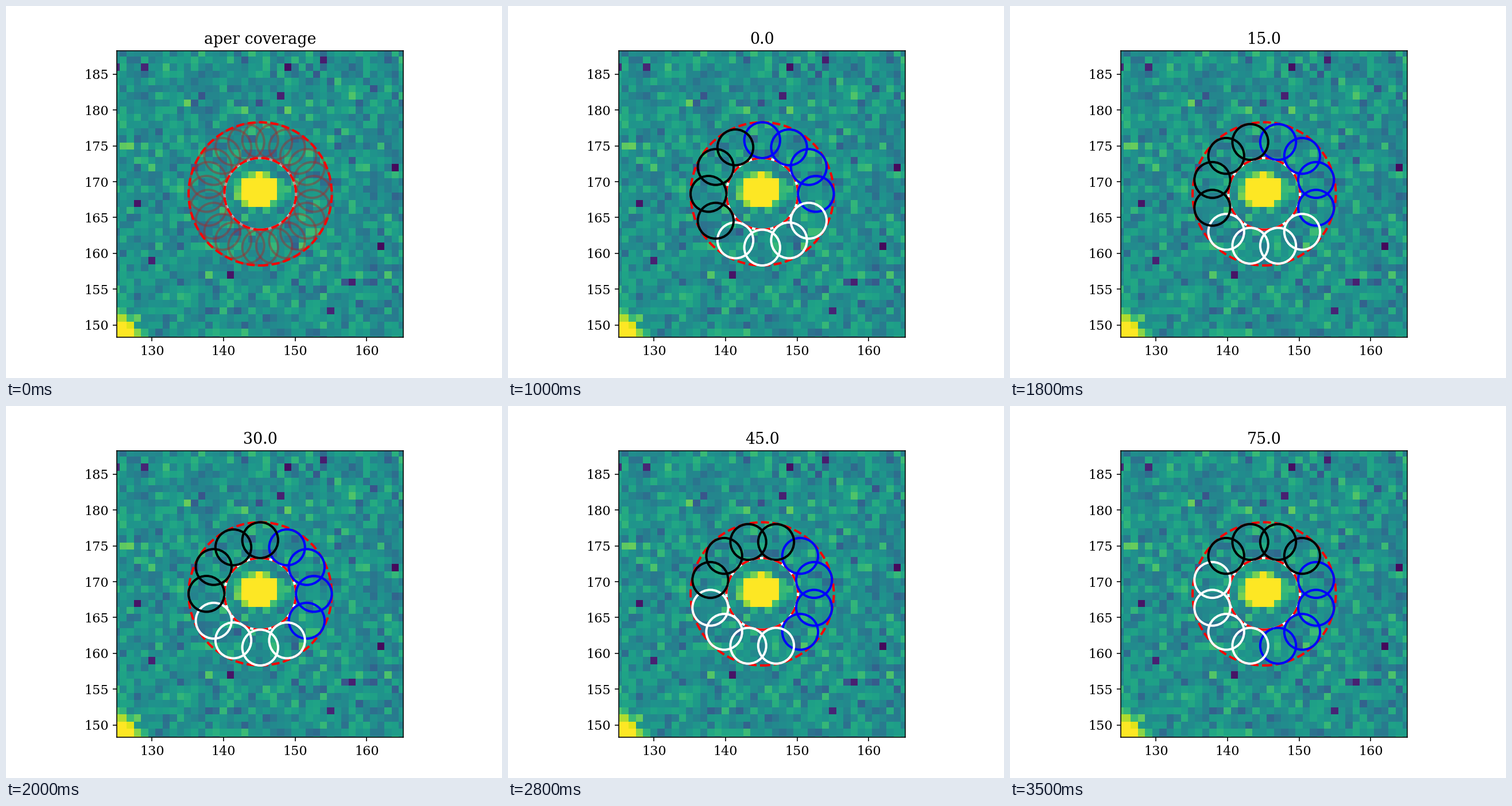
Animation, 864 px wide and 648 px high, one loop 4 s. Source, as a matplotlib script:

```python
import matplotlib.pyplot as plt
import numpy as np
from matplotlib.animation import FuncAnimation
from matplotlib.patches import Circle

plt.rcParams.update({"font.family": "DejaVu Serif", "font.size": 11.2})

CX, CY = 145.12, 168.3          # target position in detector pixels
HALF = 20                       # half width of the cutout
R_IN, R_OUT = 5, 10
R_MID, R_APER = (R_IN + R_OUT) / 2, (R_OUT - R_IN) / 2
X0, Y0, SIZE = 125, 148, 41
DASHES = (0, (3.5, 1.5))
COLORS = ("blue", "white", "black")

DEAD = [(129, 186), (149, 186), (125, 186), (128, 167), (162, 161), (158, 156),
        (164, 172), (155, 152), (130, 159), (154, 187), (148, 182), (141, 157)]
HOT = [(135, 181), (149, 180), (143, 180), (158, 182), (163, 157), (126, 175),
       (127, 175), (151, 161), (138, 157), (130, 172)]


def make_sky():
    rng = np.random.default_rng(12)
    y, x = np.mgrid[Y0:Y0 + SIZE, X0:X0 + SIZE]
    sky = np.clip(rng.normal(0.5, 0.08, x.shape), 0.24, 0.68)
    for cells, low, high in ((DEAD, 0, 0.12), (HOT, 0.7, 0.78)):
        for cx, cy in cells:
            sky[cy - Y0, cx - X0] = rng.uniform(low, high)
    sky += 8.4 * np.exp(-(0.7 * (x - 145) ** 2 + (y - 168.7) ** 2) / 1.65)
    sky += 2.4 * np.exp(-((x - 124) ** 2 + (y - 147.5) ** 2) / 8.4)
    return sky


def ring_point(deg):
    """Position on the aperture ring, clockwise from the top."""
    a = np.radians(90 - deg)
    return CX + R_MID * np.cos(a), CY + R_MID * np.sin(a)


def add_circle(center, radius, color, **kw):
    return ax.add_patch(Circle(center, radius, fill=False, ec=color, lw=2, **kw))


fig, ax = plt.subplots(figsize=(6, 4.5), dpi=144)
ax.imshow(make_sky(), cmap="viridis", vmin=0, vmax=1, origin="lower",
          interpolation="nearest",
          extent=(X0 - 0.5, X0 + SIZE - 0.5, Y0 - 0.5, Y0 + SIZE - 0.5))

inner_edge = add_circle((CX, CY), R_IN, "white", zorder=2)
coverage = [add_circle(ring_point(d), R_APER, "brown", alpha=0.45, zorder=3)
            for d in range(0, 360, 15)]
for radius in (R_IN, R_OUT):
    add_circle((CX, CY), radius, "red", ls=DASHES, zorder=4)
apertures = [add_circle(ring_point(30 * k), R_APER, COLORS[k // 4], zorder=5)
             for k in range(12)]

ax.set_xlim(CX - HALF, CX + HALF)
ax.set_ylim(CY - HALF, CY + HALF)
ax.set_xticks(range(130, 161, 10))
ax.set_yticks(range(150, 186, 5))
title = ax.set_title("")


def update(i):
    overview = i < 2
    angle = 15.0 * max(i - 2, 0)
    title.set_text("aper coverage" if overview else f"{angle:.1f}")
    inner_edge.set_alpha(0.75 if overview else 1)
    for c in coverage:
        c.set_visible(overview)
    for k, c in enumerate(apertures):
        c.set_visible(not overview)
        c.center = ring_point(30 * k + angle)
    return [title, inner_edge, *coverage, *apertures]


anim = FuncAnimation(fig, update, frames=8, interval=500, repeat=True,
                     repeat_delay=0, blit=False)
plt.show()
```
